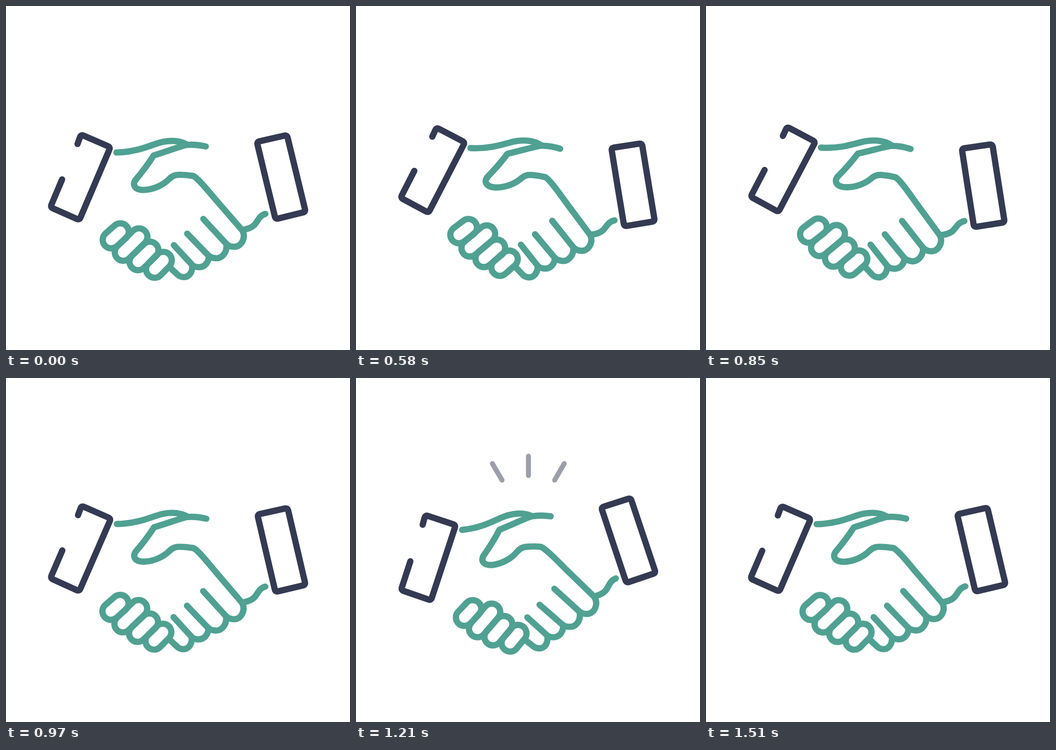
Animation, 748 px wide and 748 px high, one loop 4880 ms. Source, as an HTML page:

```html
<!DOCTYPE html>
<html lang="en">
<head>
<meta charset="utf-8">
<title>Handshake</title>
<style>
  html, body { margin: 0; width: 100%; height: 100%; overflow: hidden; background: #fff; }
  svg { display: block; width: 100%; height: 100%; }
</style>
</head>
<body>
<svg viewBox="0 0 748 748" fill="none" stroke="#343a52" stroke-width="13.6" stroke-linecap="round" stroke-linejoin="round">
  <g id="shake">
    <g stroke="#50a192">
      <!-- wrists, thumb and back of the hand -->
      <path d="M240 318.500C275 318 300 309 325 300C350 291 375 291 393 301"/>
      <path d="M434.500 305.500C420 302 405 301 393 302C385 303 350 316 321 325C311 341 297 360 281 379C275 389 279 400 300 400C322 399 342 389 355 376C362 369 368 367 378 367C390 367 398 368 407 369.500C417 374 440 402 455 420L514 488"/>
      <path d="M564 452C550 456 548 468 540 476C533 483 524 485 514 487"/>
      <!-- right fingers -->
      <path d="M514 488C522 503 513 523 497 523.500C489 524 483 521 478 516L429 463"/>
      <path d="M479 517C482 535 470 549 457 548.500C450 548 446 547 441.500 544L394 495"/>
      <path d="M441 543C441 558 432 568 419 568C412 567.500 407 566 404 562L365 520"/>
      <path d="M405 564C406 580 397 589.500 387 589.500C381 589.500 377 588 373 584L359 571"/>
      <g id="knuckles"></g>
    </g>
    <path id="leftCuff"/>
    <path id="rightCuff"/>
  </g>
  <path id="sparks" d="M0 -45.600V7.600M-99.400 -25.300L-72.800 20.300M98.600 -25.300L72 20.300"/>
</svg>
<script>
const LOOP = 4880, START = 400, STEP = 30, LAST = 38;
const byId = id => document.getElementById(id);
const clamp = v => Math.max(0, Math.min(1, v));
const mix = (a, b, p) => a + (b - a) * clamp(p);

// A line from start to end with a rounded bend at each corner.
function bent(start, corners, end) {
  const all = [start, ...corners, end];
  const near = ([x, y], [px, py]) => {
    const p = 6 / Math.hypot(px - x, py - y);
    return [mix(x, px, p), mix(y, py, p)];
  };
  return 'M' + start + corners.map((c, i) =>
    `L${near(c, all[i])}Q${c} ${near(c, all[i + 2])}`).join('') + 'L' + end;
}
byId('leftCuff').setAttribute('d', bent([155.5, 300],
  [[163, 279.5], [227, 307], [159.5, 465.5], [96.5, 437.5]], [122, 377]));
byId('rightCuff').setAttribute('d', bent([565.5, 379],
  [[545.5, 295.5], [611, 280.5], [651.5, 447.5], [586, 463.5]], [565.5, 379]));

// Left fingers are capsules: the two ends of each axis.
const R = 18.5;
const fingers = [
  [228.8, 508.5, 248.5, 491], [255, 535.5, 289, 502],
  [287, 556, 313, 531], [323, 572.5, 342, 553]
];
byId('knuckles').innerHTML = fingers.map(([x1, y1, x2, y2]) => {
  const len = Math.hypot(x2 - x1, y2 - y1);
  const nx = (y2 - y1) / len * R, ny = (x1 - x2) / len * R;
  return `<path d="M${x1 + nx} ${y1 + ny}L${x2 + nx} ${y2 + ny}A${R} ${R} 0 0 1 ${x2 - nx} ${y2 - ny}` +
    `L${x1 - nx} ${y1 - ny}A${R} ${R} 0 0 1 ${x1 + nx} ${y1 + ny}Z"/>`;
}).join('');

function angle(k) {
  if (k < 13) return mix(0, 7.9, k / 13);
  if (k < 26) return mix(7.9, -5.9, (k - 13) / 13);
  return mix(-5.9, 0.3, (k - 26) / 12);
}

function draw(now) {
  const t = now % LOOP;
  const k = Math.max(0, Math.min(LAST, Math.floor((t - START) / STEP) + 1));
  byId('shake').setAttribute('transform', `rotate(${angle(k)} 374 433)`);

  const size = Math.min(1, 0.545 + 0.049 * (k - 23));
  byId('sparks').setAttribute('transform', `translate(375 206) scale(${size})`);
  byId('sparks').setAttribute('opacity', clamp(Math.min((k - 20.7) / 15, (LAST - k) / 4)));
  requestAnimationFrame(draw);
}
draw(0);
</script>
</body>
</html>
```
